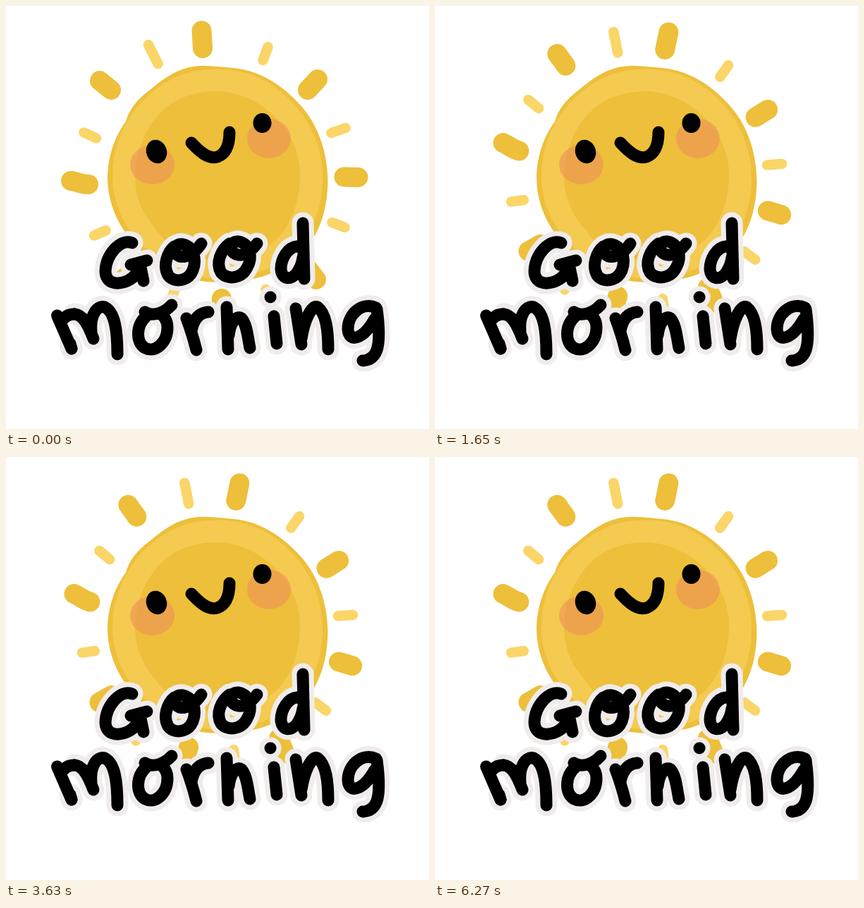
An HTML page for the animation above (6.6 s loop, 600 by 600 pixels).

```html
<!DOCTYPE html>
<html lang="en">
<head>
<meta charset="utf-8">
<title>Good morning</title>
<style>
  html, body { margin: 0; width: 100%; height: 100%; overflow: hidden; background: #fff; }
  svg { display: block; width: 100%; height: 100%; }
  .line { fill: none; stroke-linecap: round; stroke-linejoin: round; }
</style>
</head>
<body>
<svg viewBox="0 0 600 600" role="img" aria-label="Good morning">
  <defs>
    <g id="lettering">
      <!-- Good -->
      <path d="M179 336C163 329 142 352 141 376C141 394 158 396 172 390C184 384 190 376 192 364M177 367C185 365 192 363 200 361M190 366L195 390"/>
      <path d="M277 337C269 349 257 358 246 355C235 350 238 336 251 338C268 342 270 362 265 375C258 391 238 393 230 382C222 368 229 349 239 341"/>
      <path d="M356 337C347 349 336 356 326 352C315 347 318 333 330 334C347 337 350 358 342 371C334 387 314 389 305 378C297 364 305 346 317 337"/>
      <path d="M421 308L423 387M413 341C400 342 390 358 390 373C391 388 404 390 413 378C417 372 420 365 421 357"/>
      <!-- morning -->
      <path d="M91 479L93 486M97 437C109 438 116 451 124 472M121 462C119 440 128 424 140 427C154 434 158 458 158 494"/>
      <path d="M235 424C224 436 208 441 197 434M199 440C184 453 184 477 197 485C212 493 229 477 229 456C229 446 224 439 217 436"/>
      <path d="M256 443C261 456 266 472 270 488M263 461C266 444 274 435 287 434"/>
      <path d="M313 427L315 487M316 467C318 450 326 438 334 443C342 452 343 471 346 485"/>
      <path d="M375 413h.1M380 440L384 479"/>
      <path d="M411 429L419 480M419 472C423 446 433 424 442 427C454 436 457 460 457 487"/>
      <path d="M525 428C505 419 485 437 485 458C486 478 506 474 523 444M526 430C529 452 530 476 526 488C522 499 514 503 506 503"/>
    </g>
  </defs>

  <g id="rays" class="line">
    <g stroke="#edbf3a" stroke-width="28">
      <path d="M277.5 35L279 60M442 104L428 119M479.500 242.500L499.500 243M426 370L440 388M306 415L305 433M167 387L181 373M92 248C100 249 107 253 117 253M133 106L149 119"/>
    </g>
    <g stroke="#fad568" stroke-width="14.500">
      <path d="M202 55L215.500 82M371.500 58L364.500 77M461.500 180L481.500 173M462.500 307L480.500 314M110.500 179.500L128 187.500M125 325.500L141.500 318.500M241 398L231 426M368.500 402L376 420"/>
    </g>
  </g>

  <path fill="#edbf3a" d="M170 164C174 148 186 132 203 120C223 103 244 87 274 85C291 84 306 87 323 88C358 91 391 111 417 140C442 167 456 206 456.500 248C456 292 443 332 410 360C378 385 338 392 300 392C254 391 216 374 188 344C159 314 144 280 144 242C145 211 155 184 170 164Z"/>
  <path fill="#f4ca50" d="M172 164C190 133 219 108 253 96C281 88 312 87 340 95C380 106 415 138 433 175C445 199 450 224 449 252C447 293 431 331 400 355C373 376 338 387 302 387C257 385 219 367 190 336C165 310 152 278 151 244C151 213 158 187 172 164Z"/>
  <path fill="#edbf3a" d="M183 240C184 206 198 169 226 145C248 127 274 121 302 121C337 123 369 140 392 169C409 190 418 217 417 245C415 287 399 323 370 342C348 356 324 361 300 361C266 360 234 347 216 321C205 306 199 301 192 285C185 270 183 255 183 240Z"/>

  <g fill="#ef8d5b" fill-opacity=".55">
    <ellipse cx="207.500" cy="225" rx="31.500" ry="28"/>
    <ellipse cx="373" cy="188" rx="31" ry="28"/>
  </g>
  <ellipse cx="213.500" cy="206.500" rx="14.500" ry="17" transform="rotate(-18 213.500 206.500)"/>
  <ellipse cx="363.500" cy="166" rx="13" ry="14"/>
  <path class="line" stroke="#000" stroke-width="17" d="M263 194C274 206 287 218 300 214C313 209 317 195 317 179"/>

  <use href="#lettering" class="line" stroke="#efeceb" stroke-width="31"/>
  <g class="line" stroke="#000" stroke-width="17">
    <use href="#lettering"/>
    <path d="M72.500 439L93 486M78 448C83 440 89 437 97 437"/>
  </g>
</svg>
<script>
  const STEP = 330;
  const rays = document.getElementById('rays');

  // The ring of rays snaps between two poses.
  function draw(now) {
    const turned = Math.floor(now / STEP) % 2;
    rays.setAttribute('transform', `rotate(${turned * 15.2} 296 238)`);
    requestAnimationFrame(draw);
  }
  draw(0);
</script>
</body>
</html>
```
